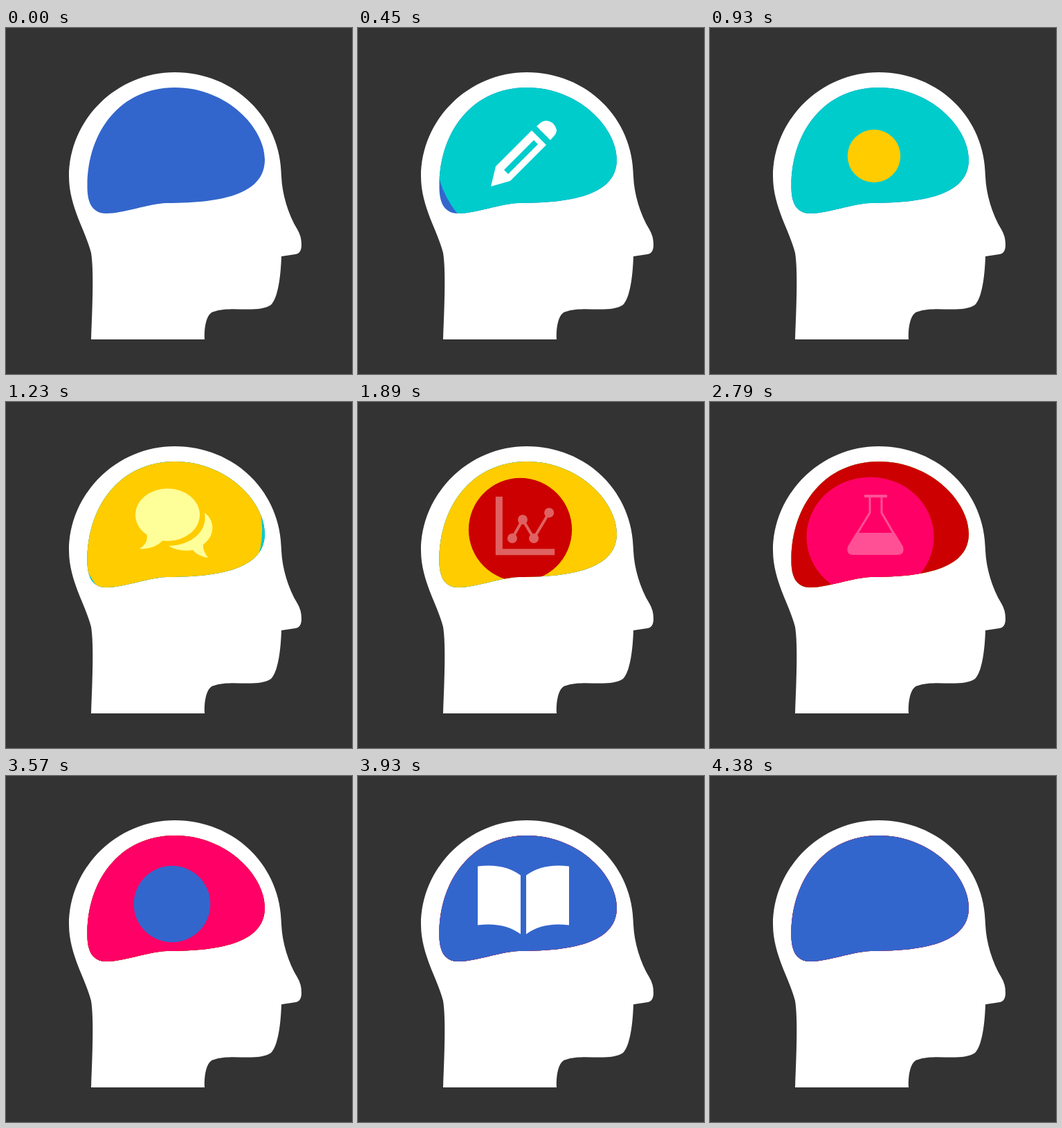
Recreate the animation shown at these times as an HTML page without scripts. Size 500x500 px, loop 4.41 s.

```html
<!DOCTYPE html>
<html lang="en">
<head>
<meta charset="utf-8">
<title>Thinking head</title>
<style>
  html, body { margin: 0; width: 100%; height: 100%; overflow: hidden; background: #333; }
  svg { display: block; width: 100%; height: 100%; }
  .icon { fill: #fff; }
  .line { fill: none; stroke: #fff; }
</style>
</head>
<body>
<svg viewBox="0 0 500 500">
  <defs>
    <clipPath id="inside">
      <path d="M244 86C320 86 374 145 374 190C374 238 318 253 232 253C205 254 170 268 145 268C123 268 117 250 117.500 227C118 150 165 86 244 86Z"/>
    </clipPath>
  </defs>

  <path fill="#fff" d="M123 450H287C286 432 290 412 300 410C325 401 363 413 383 400C393 390 397 360 398 330L418 327Q427 326 427 313Q427 301 421 291C408 270 399 240 398 215C398 130 330 64 244 64C160 64 91 132 91 215C91 258 116 295 123 325C127 350 125 400 123 450Z"/>

  <g clip-path="url(#inside)">
    <rect x="100" y="70" width="300" height="220" fill="#36c"/>

    <!-- pencil -->
    <g transform="translate(245 183)">
      <circle r="155" fill="#0cc">
        <animateTransform attributeName="transform" type="scale" values="0;0;1;1" keyTimes="0;.0075;.1186;1" dur="4.41s" repeatCount="indefinite"/>
      </circle>
    </g>
    <g transform="translate(240 180)">
      <g class="icon" opacity="0">
        <animate attributeName="opacity" values="0;0;1;1;0;0" keyTimes="0;.0506;.0778;.1209;.1746;1" dur="4.41s" repeatCount="indefinite"/>
        <animateTransform attributeName="transform" type="scale" values=".64;.64;1;1;.64;.64" keyTimes="0;.046;.0778;.1209;.1746;1" dur="4.41s" repeatCount="indefinite"/>
        <g transform="translate(-240 -180)">
          <path fill-rule="evenodd" d="M192 229L199 200L251 148L272 169L220 221ZM254 162L260 168L217 211L211 205Z"/>
          <path d="M258 142L265 136Q273 131 282 138Q290 147 285 154L278 162Z"/>
        </g>
      </g>
    </g>

    <!-- speech bubbles -->
    <g transform="translate(237 185)">
      <circle r="155" fill="#fc0">
        <animateTransform attributeName="transform" type="scale" values="0;0;1;1" keyTimes="0;.1837;.2948;1" dur="4.41s" repeatCount="indefinite"/>
      </circle>
    </g>
    <g transform="translate(240 180)">
      <g fill="#ff9" opacity="0">
        <animate attributeName="opacity" values="0;0;1;1;0;0" keyTimes="0;.2268;.254;.297;.3639;1" dur="4.41s" repeatCount="indefinite"/>
        <animateTransform attributeName="transform" type="scale" values=".64;.64;1;1;.64;.64" keyTimes="0;.2222;.254;.297;.3639;1" dur="4.41s" repeatCount="indefinite"/>
        <g transform="translate(-240 -180)">
          <ellipse cx="233.500" cy="163" rx="46.500" ry="38"/>
          <path d="M203 190Q207 203 193 212Q213 214 228 199Z"/>
          <path d="M287 160C302 171 303 193 285 206Q284 215 292 225Q277 223 270 214Q250 217 235 208C268 207 292 187 287 160Z"/>
        </g>
      </g>
    </g>

    <!-- chart -->
    <g transform="translate(234.500 184.500)">
      <circle r="155" fill="#c00">
        <animateTransform attributeName="transform" type="scale" values="0;0;1;1" keyTimes="0;.3753;.4864;1" dur="4.41s" repeatCount="indefinite"/>
      </circle>
    </g>
    <g transform="translate(240 180)">
      <g class="icon" opacity="0">
        <animate attributeName="opacity" values="0;0;1;1;0;0" keyTimes="0;.4184;.4456;.4887;.5669;1" dur="4.41s" repeatCount="indefinite"/>
        <animateTransform attributeName="transform" type="scale" values=".64;.64;1;1;.64;.64" keyTimes="0;.4138;.4456;.4887;.5669;1" dur="4.41s" repeatCount="indefinite"/>
        <g transform="scale(1.24) translate(-240 -180)">
          <path d="M199 137H209V212H284V221H199Z"/>
          <path class="line" stroke-width="4" d="M223 197L238 170L254 197L276 160"/>
          <circle cx="223" cy="197" r="7"/>
          <circle cx="238" cy="170" r="7"/>
          <circle cx="254" cy="197" r="7"/>
          <circle cx="276" cy="160" r="7"/>
        </g>
      </g>
    </g>

    <!-- flask -->
    <g transform="translate(235.500 183)">
      <ellipse cx="-7.200" cy="21.500" rx="165" ry="155" fill="#f06">
        <animateTransform attributeName="transform" type="scale" values="0;0;1;1" keyTimes="0;.5785;.676;1" dur="4.41s" repeatCount="indefinite"/>
      </ellipse>
    </g>
    <g transform="translate(240 180)">
      <g class="icon" opacity="0">
        <animate attributeName="opacity" values="0;0;1;1;0;0" keyTimes="0;.6236;.6531;.6916;.7585;1" dur="4.41s" repeatCount="indefinite"/>
        <animateTransform attributeName="transform" type="scale" values=".64;.64;1;1;.64;.64" keyTimes="0;.619;.6531;.6916;.7585;1" dur="4.41s" repeatCount="indefinite"/>
        <g transform="scale(1.27) translate(-240 -180)">
          <path d="M223 134H256V138H223Z"/>
          <path class="line" stroke-width="3" d="M231 138V160L212 191M248 138V160L266 191"/>
          <path d="M211 189H267L279 209Q282 221 271 221H207Q196 221 199 209Z"/>
        </g>
      </g>
    </g>

    <!-- book -->
    <g transform="translate(240 185)">
      <circle r="155" fill="#36c">
        <animateTransform attributeName="transform" type="scale" values="0;0;1;1" keyTimes="0;.7701;.8812;1" dur="4.41s" repeatCount="indefinite"/>
      </circle>
    </g>
    <g transform="translate(239 179.500)">
      <g class="icon" opacity="0">
        <animate attributeName="opacity" values="0;0;1;1;0;0" keyTimes="0;.8163;.8435;.8957;.9909;1" dur="4.41s" repeatCount="indefinite"/>
        <animateTransform attributeName="transform" type="scale" values=".64;.64;1;1;.64;.64" keyTimes="0;.8118;.8435;.8957;.9909;1" dur="4.41s" repeatCount="indefinite"/>
        <path id="page" d="M-4 -36Q-28 -54 -66 -49V36Q-28 31 -4 49Z"/>
        <use href="#page" transform="scale(-1 1)"/>
      </g>
    </g>
  </g>
</svg>
</body>
</html>
```
